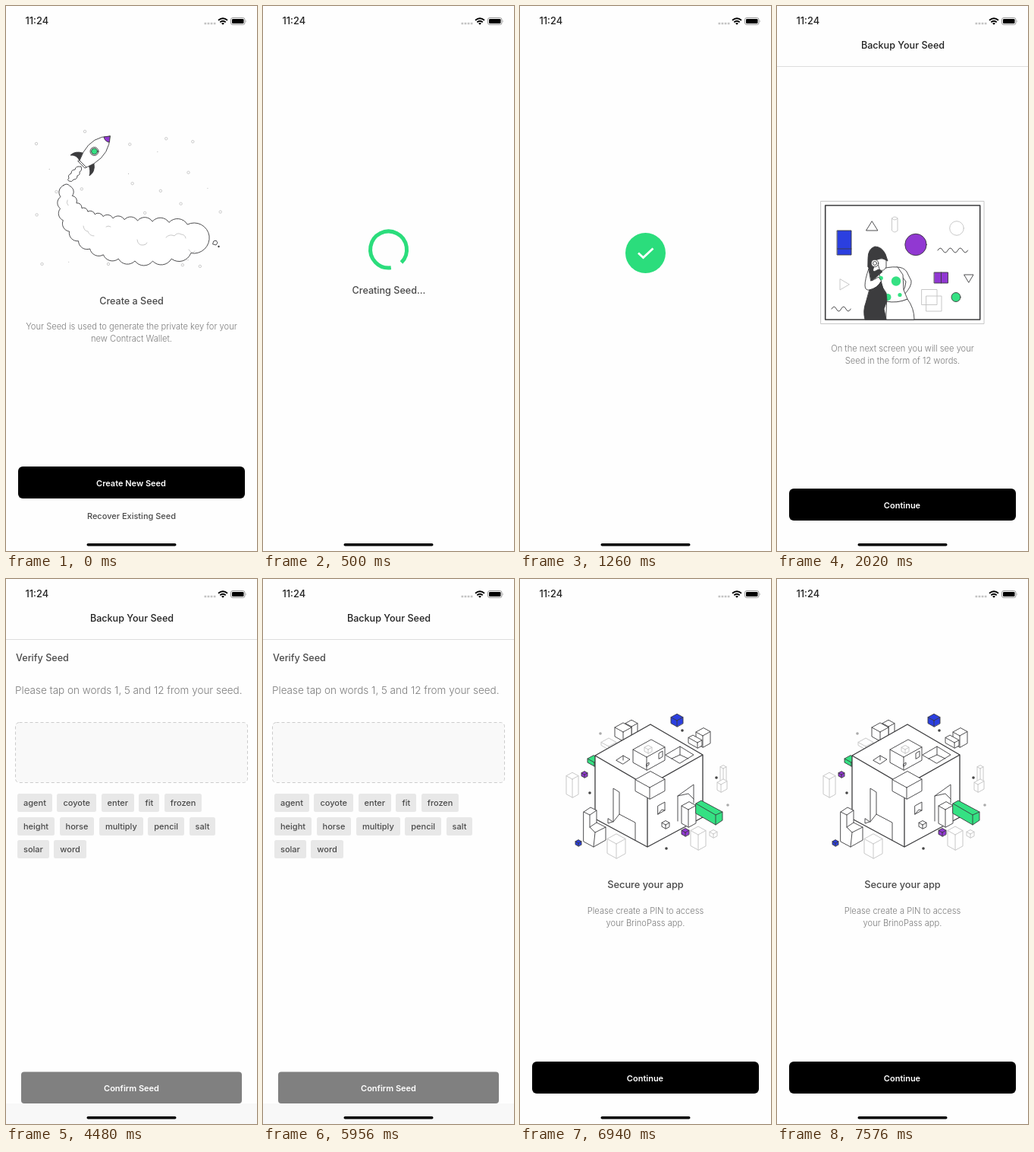
These frames come from a looping animation (331 px wide and 716 px high, 8 s). An HTML page:

```html
<!DOCTYPE html>
<html lang="en">
<head>
<meta charset="utf-8">
<title>Seed setup</title>
<style>
html, body { margin: 0; width: 100%; height: 100%; overflow: hidden; background: #fefefe; }
svg { display: block; width: 100%; height: 100%; }
text, .chips { font: 500 12.6px Inter, sans-serif; fill: #4a4a4a; text-anchor: middle; }
.scene { display: none; }
.start { text-anchor: start; }
.head { fill: #222; }
.soft { font-weight: 300; font-size: 11.15px; fill: #7c7c7c; }
.btn { font-weight: 600; font-size: 11px; fill: #fff; }
.chips { display: flex; flex-wrap: wrap; gap: 6.5px; font-size: 11px; line-height: 24px; color: #4a4a4a; }
.chips span { padding: 0 8px; border-radius: 2.5px; background: #e8e8e8; }
.ink { fill: #fff; stroke: #3c3c3e; stroke-width: .9; stroke-linejoin: round; stroke-linecap: round; }
.open { fill: none; }
.pale { stroke: #c2c2c2; }
.dark { fill: #3c3c3e; }
.green { fill: #35e183; }
.purple { fill: #9138d2; }
.blue { fill: #2b3fe0; }
</style>
</head>
<body>
<svg viewBox="0 0 331 716" preserveAspectRatio="none">
  <rect width="331" height="716" fill="#fefefe"/>

  <g class="scene">
    <g id="sky"></g>
    <path id="trail" class="ink"/>
    <path class="ink pale open" d="M102 289q1 7 6 7q2 6 8 6M173 307q1 8 8 7q4 0 5-3M211 304q5-5 11-2q4-5 9-2q5 0 6 5M241 320q4 7 8 2M132 290q3-2 6 0M81 255q-2 4 1 7"/>
    <path class="ink" d="M97 211q-5-1-6 4q-5 0-5 5q-5 2-3 6q-3 3 0 4q4 2 6-2q5 0 5-5q4-1 3-5q4-2 2-7z"/>
    <path class="ink" d="M274 309l3-1 2 3-2 3-4-1z"/>
    <circle class="dark" cx="280.5" cy="316" r="1.2"/>
    <path class="ink dark" d="M101 193q-10-3-16 3q8-1 12 7zM109 209q3 8 1 14q8-5 6-16z"/>
    <path class="ink" d="M137 171Q114 171 102 192L97 203L106 212L116 207Q137 194 137 171z"/>
    <path class="ink purple" d="M137 171l-8 1q1 6 7 7z"/>
    <path class="ink" d="M97 203l9 9-2 1-9-9z"/>
    <circle class="ink" cx="116.500" cy="191" r="5.500"/>
    <circle class="ink green" cx="116.500" cy="191" r="4"/>
    <text x="165.500" y="391.500">Create a Seed</text>
    <text class="soft" x="165.500" y="425">Your Seed is used to generate the private key for your</text>
    <text class="soft" x="165.500" y="441">new Contract Wallet.</text>
    <rect x="16" y="605" width="299" height="42" rx="6"/>
    <text class="btn" x="165" y="630.500">Create New Seed</text>
    <text x="165.500" y="674" style="font-size:11px">Recover Existing Seed</text>
  </g>

  <g class="scene">
    <path d="M168.800 343.800A24 24 0 1 1 182.500 337" fill="none" stroke="#2bdd7c" stroke-width="5"/>
    <text x="166" y="377.500">Creating Seed...</text>
  </g>

  <g class="scene">
    <circle cx="165.500" cy="324.500" r="26.500" fill="#2bdd7c"/>
    <path d="M156 324.500l6.500 6 13-12" fill="none" stroke="#fff" stroke-width="2.800"/>
  </g>

  <g class="scene">
    <path d="M0 79.500H331" stroke="#ddd"/>
    <text class="head" x="166" y="55.500">Backup Your Seed</text>
    <rect class="ink pale" x="58" y="256.500" width="215" height="161"/>
    <rect class="ink" x="63.700" y="262" width="204" height="150" style="stroke-width:1.6"/>
    <rect class="ink blue" x="79.500" y="295" width="18.500" height="32"/>
    <path class="ink open" d="M79.500 319H98M125 283l-7.500 12h15zM247 353h12l-6 10zM212 321q3.300-6 6.600 0t6.600 0 6.600 0 6.600 0 6.600 0 6.600 0M72 398q3.200-6 6.300 0t6.300 0 6.300 0 6.300 0"/>
    <path class="ink pale" d="M83 359v14l12-7zM151.500 279v16q3.700 4 7.500 0v-16q-3.700-4-7.500 0q3.700 4 7.500 0M197 381h20v20h-20zM191 372.500h20v20h-20z"/>
    <circle class="ink purple" cx="183" cy="313.500" r="14.200"/>
    <circle class="ink pale" cx="237" cy="292" r="9.300"/>
    <path class="ink purple" d="M207.500 350h18v14h-18zM216.500 350v14"/>
    <circle class="ink green" cx="236" cy="382.500" r="6"/>
    <path class="ink" d="M145 388q14 2 27-3q9 12 9 27h-37z"/>
    <path class="ink" d="M158 343q9 0 13 6l6 12q1 7-9 18l-3-2q5-8 5-15l-8-10z"/>
    <path class="ink" d="M134 347q12-5 25-4l7 10 1 20 5 12q-14 6-28 3z"/>
    <circle class="green" cx="157" cy="361.500" r="6.200"/>
    <circle class="green" cx="137" cy="357.500" r="2.800"/>
    <circle class="green" cx="146" cy="382.500" r="4.500"/>
    <circle class="green" cx="162" cy="379.500" r="2.600"/>
    <path class="ink" d="M131 332h13v11q-3 6-8 4z"/>
    <path class="ink dark" d="M120 331q0-12 9-15q9 0 14 10l3 9-8-4-8 3-4 15-6-6z"/>
    <path class="ink" d="M121 345q-5 14-5 22q0 7 6 6q10-2 16-11l-4-6-9 5 3-12z"/>
    <path class="ink dark" d="M122 373q10-2 15-11q2 9 7 15l1 10-4 11 3 14h-28q-3-12 1-22zM121 345l7 4 6-3 5 3-9 8-6 4z"/>
    <circle class="ink" cx="129" cy="338" r="4.800"/>
    <circle class="ink" cx="129" cy="338" r="2.500"/>
    <text class="soft" x="165.500" y="453.500">On the next screen you will see your</text>
    <text class="soft" x="165.500" y="469.500">Seed in the form of 12 words.</text>
    <rect x="16" y="634" width="299" height="42" rx="6"/>
    <text class="btn" x="165" y="660">Continue</text>
  </g>

  <g class="scene">
    <path d="M0 79.500H331" stroke="#ddd"/>
    <text class="head" x="166" y="55.500">Backup Your Seed</text>
    <text class="start" x="13" y="107.500">Verify Seed</text>
    <text class="start soft" x="12" y="151" style="font-size:13.5px">Please tap on words 1, 5 and 12 from your seed.</text>
    <rect x="12.500" y="188.500" width="306" height="79" rx="5" fill="#f9f9f9" stroke="#ccc" stroke-dasharray="4 3"/>
    <foreignObject x="15" y="282" width="292" height="90"><div class="chips" id="chips"></div></foreignObject>
    <rect y="689" width="331" height="27" fill="#f8f8f8"/>
    <rect x="20" y="647.500" width="291" height="41.500" rx="4" fill="#808080"/>
    <text class="btn" x="165.500" y="672.500">Confirm Seed</text>
  </g>

  <g class="scene">
    <g id="behind"></g>
    <path class="ink" style="stroke-width:1.3" d="M172 191L241 231V313L168 352L99 315V232zM99 232L168 272L241 231M168 272V352"/>
    <path class="ink open" d="M123 319v-44l8 5v29l21 11v23M123 319l8-10M116 315v6l6-2zM182 298l9-5v11l-9 5zM182 309l5-6 4 1M208 318v-33l21-15v24M208 285l14-3 7 7M192 231l19-11 18 11-18 11zM211 220v11l-11 5M211 231l11 5M127 238l9-6 9 5-9 6zM136 232v6"/>
    <g id="front"></g>
    <path class="ink" d="M84 306l9-6 8 4v16l12 6v17l-16 9-13-7z"/>
    <path class="ink open" d="M84 306l8 4 9-6M92 310v16l7 7 14-7M92 326l9-6M99 333l-2 19"/>
    <path class="ink green" d="M232 295l7-4 28 15v11l-9 6-26-15z"/>
    <path class="ink open" d="M232 295l26 15 9-4M258 310v13M183 236v-7l5-3v7zM167 243l3-2v3l-3 2z"/>
    <g id="specks"></g>
    <text x="165.500" y="406" style="font-size:12.8px">Secure your app</text>
    <text class="soft" x="165.500" y="440">Please create a PIN to access</text>
    <text class="soft" x="165.500" y="456">your BrinoPass app.</text>
    <rect x="16" y="634" width="299" height="42" rx="6"/>
    <text class="btn" x="165" y="660">Continue</text>
  </g>

  <text class="start head" x="25.500" y="24.300" style="font-size:12.8px">11:24</text>
  <path d="M261.500 23H277" stroke="#c4c4c4" stroke-width="2.600" stroke-dasharray="2.700 1.400"/>
  <path d="M280 18.700q6-5 12 0M282.300 21.200q3.700-3 7.400 0" fill="none" stroke="#000" stroke-width="1.900"/>
  <path d="M284 22.800q2-1.500 4 0l-2 2z"/>
  <rect x="296.500" y="15.500" width="18.500" height="9" rx="2.500" fill="none" stroke="#999"/>
  <rect x="298" y="17" width="15.500" height="6" rx="1.200"/>
  <path d="M316.300 18.500q1.500 1.500 0 3z" fill="#999"/>
  <rect x="106.500" y="706" width="118" height="3.500" rx="1.750"/>
</svg>
<script>
const $ = id => document.getElementById(id);
const circle = (x, y, r, style) => `<circle cx="${x}" cy="${y}" r="${r}" ${style}/>`;

let seed = 11;
const random = () => (seed = seed * 16807 % 2147483647) / 2147483647;

// One ring and, in every other cell, a faint star per cell of a jittered grid
function sky() {
  let out = '';
  for (let i = 0; i < 20; i++) {
    const x = 40 + i % 5 * 50, y = 163 + Math.floor(i / 5) * 48;
    const spot = () => [x + random() * 45, y + random() * 40];
    out += circle(...spot(), 1.7, 'fill="none" stroke="#c4c4c4" stroke-width=".9"');
    if (i % 2) out += circle(...spot(), 0.6, 'fill="#bbb"');
  }
  return out;
}

// Point on one side (-1 top, 1 bottom) of a curved plume that widens, then closes
function plumeEdge(t, side) {
  const u = 1 - t;
  const bezier = (a, b, c, d) => u * u * u * a + 3 * u * u * t * b + 3 * u * t * t * c + t * t * t * d;
  const slope = (a, b, c, d) => u * u * (b - a) + 2 * u * t * (c - b) + t * t * (d - c);
  const xs = [80, 72, 150, 268], ys = [236, 300, 322, 302];
  const dx = slope(...xs), dy = slope(...ys);
  const half = (4 + 23 * Math.sin(t * Math.PI / 1.5)) * Math.sqrt(1 - t ** 10) * side / Math.hypot(dx, dy);
  return [bezier(...xs) - dy * half, bezier(...ys) + dx * half];
}

// Closed outline of outward bumps between the given points
function bumps(points) {
  let [px, py] = points[points.length - 1];
  let d = `M${px} ${py}`;
  for (const [x, y] of points) {
    const r = Math.hypot(x - px, y - py) * 0.62;
    d += `A${r} ${r} 0 0 1 ${x} ${y}`;
    [px, py] = [x, y];
  }
  return d + 'z';
}

const STEPS = 13;
const edge = side => Array.from({ length: STEPS }, (_, i) => plumeEdge(i / STEPS, side));
$('sky').innerHTML = sky();
$('trail').setAttribute('d', bumps([...edge(-1), plumeEdge(1, 1), ...edge(1).reverse()]));

$('chips').innerHTML = 'agent coyote enter fit frozen height horse multiply pencil salt solar word'
  .split(' ').map(word => `<span>${word}</span>`).join('');

// Isometric box from its lowest corner, with left, right and upward extents
function box(x, y, l, r, h, style = '') {
  const a = l * 0.55, b = r * 0.55;
  return `<path class="ink ${style}" d="M${x} ${y}l${-l} ${-a}v${-h}l${r} ${-b}l${l} ${a}v${h}z` +
    `v${-h}M${x} ${y - h}l${-l} ${-a}M${x} ${y - h}l${r} ${-b}"/>`;
}
const cube = (x, y, size, style) => box(x, y, size, size, size, style);

$('behind').innerHTML = box(117, 224, 10, 10, 4, 'pale') + box(147, 206, 8, 8, 12) +
  box(136, 213, 11, 11, 12) + box(98, 246, 9, 8, 5, 'green') + cube(207, 194, 8, 'blue') +
  box(241, 221, 9, 10, 15) + box(234, 222, 12, 6, 7) + box(69, 287, 8, 8, 24, 'pale') +
  box(268, 273, 4, 4, 24, 'pale') + box(265, 280, 5, 8, 10, 'pale') + cube(85, 261, 4, 'purple');
$('front').innerHTML = box(171, 289, 19, 20, 15) + box(167, 251, 18, 24, 17) + cube(169, 229, 5, 'pale') +
  cube(192, 328, 5) + box(127, 367, 12, 12, 19, 'pale') + box(235, 356, 10, 10, 20, 'pale') +
  cube(255, 340, 5, 'pale') + box(222, 326, 9, 10, 23) + cube(218, 338, 5, 'purple') + cube(77, 351, 4, 'blue');
$('specks').innerHTML = [[106, 203], [92, 281], [259, 261], [193, 354], [274, 297], [214, 199]]
  .map(([x, y], i) => circle(x, y, 1.8, `fill="${i % 4 ? '#444' : '#aaa'}"`)).join('');

const LOOP = 8000;
const cuts = [500, 1260, 2020, 4480, 6940];
const scenes = document.querySelectorAll('.scene');

function draw() {
  const t = performance.now() % LOOP;
  const current = cuts.filter(c => c <= t).length;
  scenes.forEach((s, i) => { s.style.display = i === current ? 'inline' : 'none'; });
  requestAnimationFrame(draw);
}
draw();
</script>
</body>
</html>
```
